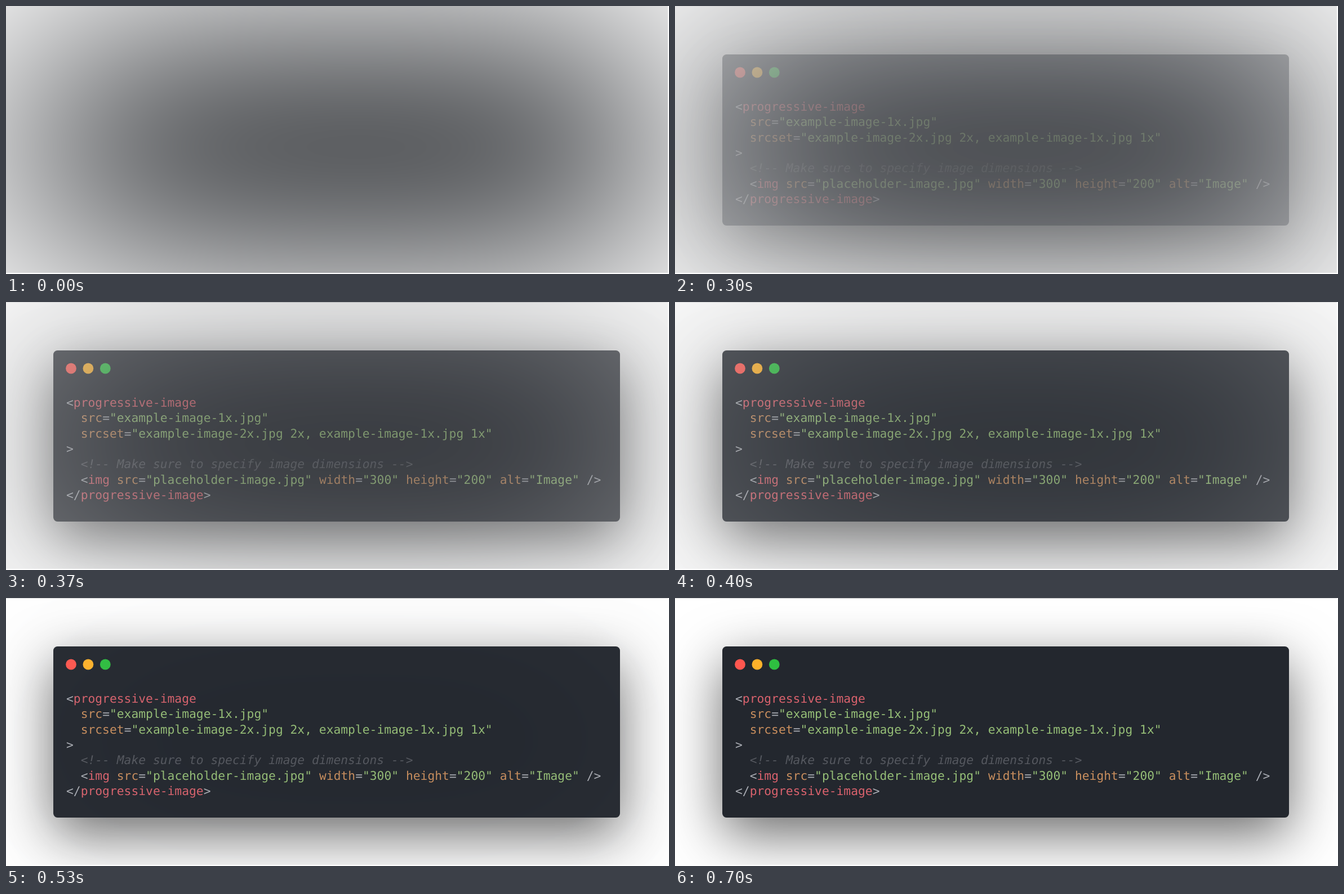
Animation of 1177x476 px, one loop 730 ms. Source, as an HTML page with a canvas:

```html
<!DOCTYPE html>
<html lang="en">
<head>
<meta charset="utf-8">
<title>Progressive image</title>
<style>
  html, body { margin: 0; width: 100%; height: 100%; overflow: hidden; background: #fff; }
  canvas { display: block; }
</style>
</head>
<body>
<canvas id="stage" width="1177" height="476"></canvas>
<script>
const W = 1177, H = 476;
const PIC = { w: 1175, h: 474 };
const LOOP = 730, FADE_START = 700 / 3, FADE_TIME = 400;
const FONT_SIZE = 21.31, CHAR = FONT_SIZE * 0.602, LEFT = 107, BASE = 186, LEADING = 27.35;

const COLORS = { g: '#abaeb5', r: '#da626d', o: '#ca8f5e', s: '#96bf77', c: '#55585f' };

// Each run is a colour key and its text
const CODE = [
  [['g', '<'], ['r', 'progressive-image']],
  [['o', '  src'], ['g', '='], ['s', '"example-image-1x.jpg"']],
  [['o', '  srcset'], ['g', '='], ['s', '"example-image-2x.jpg 2x, example-image-1x.jpg 1x"']],
  [['g', '>']],
  [['c', '  <!-- Make sure to specify image dimensions -->']],
  [['g', '  <'], ['r', 'img'], ['o', ' src'], ['g', '='], ['s', '"placeholder-image.jpg"'],
   ['o', ' width'], ['g', '='], ['s', '"300"'], ['o', ' height'], ['g', '='], ['s', '"200"'],
   ['o', ' alt'], ['g', '='], ['s', '"Image"'], ['g', ' />']],
  [['g', '</'], ['r', 'progressive-image'], ['g', '>']]
];

function layer(paint) {
  const canvas = document.createElement('canvas');
  canvas.width = PIC.w;
  canvas.height = PIC.h;
  paint(canvas.getContext('2d'));
  return canvas;
}

// Smooth step shaped like a Gaussian integral
const soft = z => 1 / (1 + Math.exp(-1.5976 * z - 0.0706 * z ** 3));

function paintBlur(c) {
  const img = c.createImageData(PIC.w, PIC.h);
  let i = 0;
  for (let y = 0; y < PIC.h; y++) {
    const v = Math.exp(-(((y - 250) / 210) ** 2) / 2);
    for (let x = 0; x < PIC.w; x++) {
      const d = v * soft((x - 50) / 205) * soft((1135 - x) / 180);
      img.data[i++] = 255 - 162 * d;
      img.data[i++] = 255 - 160 * d;
      img.data[i++] = 255 - 157 * d;
      img.data[i++] = 255;
    }
  }
  c.putImageData(img, 0, 0);
}

function paintWindow(c) {
  c.fillStyle = '#fff';
  c.fillRect(0, 0, PIC.w, PIC.h);

  c.save();
  c.shadowColor = 'rgba(0, 0, 0, 0.59)';
  c.shadowBlur = 97;
  c.shadowOffsetY = 30;
  c.fillStyle = '#23272e';
  c.beginPath();
  c.roundRect(84, 86, 1006, 304, 7.5);
  c.fill();
  c.restore();

  ['#ff574f', '#ffb22a', '#2ebf40'].forEach((color, i) => {
    c.fillStyle = color;
    c.beginPath();
    c.arc(115.5 + 30.4 * i, 118, 9.4, 0, Math.PI * 2);
    c.fill();
  });

  CODE.forEach((runs, row) => {
    let col = 0;
    for (const [key, text] of runs) {
      const style = key === 'c' ? 'italic ' : '';
      c.font = `${style}${FONT_SIZE}px "DejaVu Sans Mono", monospace`;
      c.textRendering = 'geometricPrecision';
      c.fillStyle = COLORS[key];
      const word = text.trimStart();
      col += text.length - word.length;
      c.fillText(word, LEFT + col * CHAR, BASE + row * LEADING);
      col += word.length;
    }
  });
}

// CSS "ease": cubic-bezier(0.25, 0.1, 0.25, 1)
function ease(p) {
  if (p <= 0) return 0;
  if (p >= 1) return 1;
  const curve = (a, b, u) => 3 * a * u * (1 - u) ** 2 + 3 * b * u * u * (1 - u) + u ** 3;
  let lo = 0, hi = 1;
  for (let i = 0; i < 24; i++) {
    const mid = (lo + hi) / 2;
    if (curve(0.25, 0.25, mid) < p) lo = mid; else hi = mid;
  }
  return curve(0.1, 1, lo);
}

// Thirty steps a second, each starting on a whole 10 ms
function stepTime(t) {
  let n = Math.ceil(t * 0.03) + 1;
  while (Math.round(n * 10 / 3) * 10 > t) n--;
  return n < 8 ? 0 : n * 100 / 3;
}

const ctx = document.getElementById('stage').getContext('2d');
const blurred = layer(paintBlur);
const sharp = layer(paintWindow);

function draw(t) {
  ctx.globalAlpha = 1;
  ctx.fillStyle = '#fff';
  ctx.fillRect(0, 0, W, H);
  ctx.drawImage(blurred, 0, 0);
  ctx.globalAlpha = ease((stepTime(t) - FADE_START) / FADE_TIME);
  // The top row keeps the blurred picture
  ctx.drawImage(sharp, 0, 1, PIC.w, PIC.h - 1, 0, 1, PIC.w, PIC.h - 1);
}

const start = performance.now();
function tick() {
  draw((performance.now() - start) % LOOP);
  requestAnimationFrame(tick);
}
tick();
</script>
</body>
</html>
```
